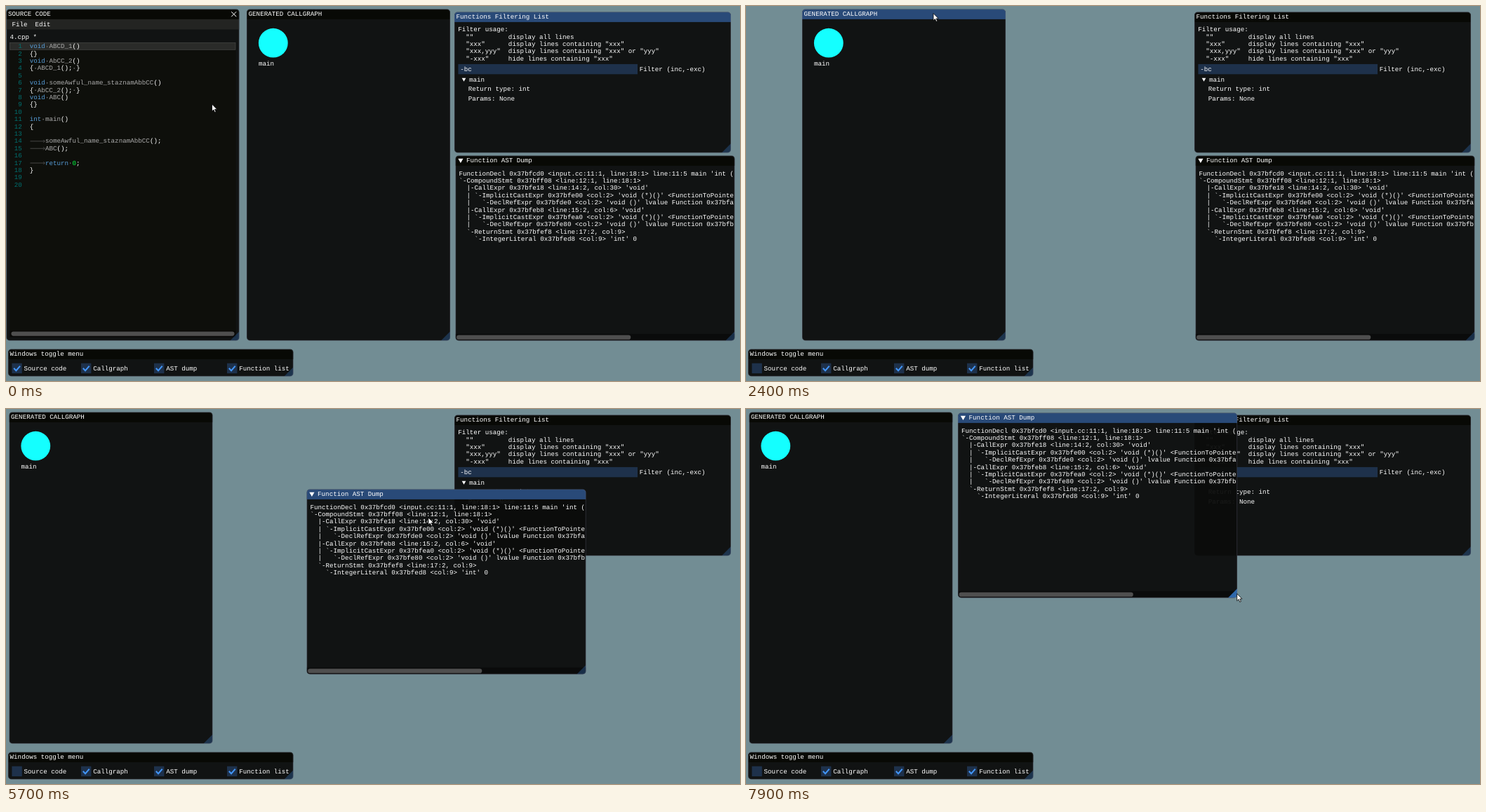
Animation of 1046 by 535 pixels, one loop 8 s. Source, as an HTML page:

```html
<!DOCTYPE html>
<html lang="en">
<head>
<meta charset="utf-8">
<title>Callgraph tool</title>
<style>
  html, body { margin: 0; width: 100%; height: 100%; overflow: hidden; background: #728d94; }
  svg { display: block; width: 100%; height: 100%; }
  text {
    font: 9.2px "Liberation Mono", monospace;
    fill: #fff;
    white-space: pre;
    text-rendering: geometricPrecision;
  }
  .body { fill: rgba(11, 12, 11, .94); }
  .title { fill: #080905; }
  .active .title { fill: #294a78; }
  .edge { fill: none; stroke: rgba(110, 110, 128, .42); stroke-width: .8; }
  .grip { fill: rgba(66, 150, 250, .25); }
  .grip.hover { fill: rgba(66, 150, 250, .67); }
  .frame { fill: rgba(41, 74, 122, .54); }
  .track { fill: rgba(5, 5, 5, .53); }
  .thumb { fill: #4f4f4f; }
  .tick { fill: none; stroke: #4296fa; stroke-width: 2; }
  .blank { fill: none; stroke: #555; stroke-width: .8; }
  .dot { fill: #656565; }
  .keyword { fill: #569cd6; }
  .number { fill: #00ff40; }
  .name { fill: #aaa; }
  .lineno { fill: #007070; }
</style>
</head>
<body>
<svg viewBox="0 0 1046 535"></svg>
<script>
const ADVANCE = 5.52, LINE = 10.39, LOOP = 8000, STEP = 100;
const svg = document.querySelector('svg');

function add(parent, tag, attrs, content) {
  const node = document.createElementNS('http://www.w3.org/2000/svg', tag);
  for (const key in attrs) node.setAttribute(key, attrs[key]);
  if (content !== undefined) node.textContent = content;
  parent.append(node);
  return node;
}
const label = (parent, x, y, content, cls = '') => add(parent, 'text', { x, y, class: cls }, content);
const box = (parent, x, y, width, height, cls, rx = 0) =>
  add(parent, 'rect', { x, y, width, height, rx, class: cls });
const rows = (parent, x, y, lines) => lines.forEach((line, i) => label(parent, x, y + i * LINE, line));

function makeWindow(id, x, y, w, h, title, titleX = 2.6) {
  const clip = add(svg, 'clipPath', { id: id + '-clip' });
  box(clip, 0, 0, w, h, '', 4.8);
  const root = add(svg, 'g', {});
  const inner = add(root, 'g', { 'clip-path': `url(#${id}-clip)` });
  box(inner, 0, 0, w, h, 'body');
  box(inner, 0, 0, w, 14.4, 'title');
  label(inner, titleX, 9.9, title);
  const content = add(inner, 'g', {});
  const grip = add(inner, 'path', { d: `M${w} ${h}v-13.2l-13.2 13.2z`, class: 'grip' });
  box(root, .3, .3, w - .6, h - .6, 'edge', 4.6);
  const win = {
    root, content, grip,
    move: (dx, dy) => root.setAttribute('transform', `translate(${x + dx} ${y + dy})`)
  };
  win.move(0, 0);
  return win;
}

function drawCode(parent, x, y, source) {
  const token = /(\t)|( )|(\b(?:void|int|return)\b)|([A-Za-z_]\w*)|(\d+)|([^\s\w]+)/g;
  const classes = ['', '', '', 'keyword', 'name', 'number', ''];
  source.forEach((line, i) => {
    const base = y + i * LINE;
    label(parent, x - 11 - ADVANCE * String(i + 1).length, base, i + 1, 'lineno');
    let col = 0;
    for (const match of line.matchAll(token)) {
      const left = x + col * ADVANCE, mid = base - 2.5;
      if (match[1]) {
        add(parent, 'path', { d: `M${left + .7} ${mid}h20.8m-2 -2l2 2l-2 2`, class: 'blank' });
        col += 4;
        continue;
      }
      if (match[2]) {
        add(parent, 'circle', { cx: left + ADVANCE / 2, cy: mid, r: .9, class: 'dot' });
      } else {
        label(parent, left, base, match[0], classes[match.findIndex((part, k) => k && part)]);
      }
      col += match[0].length;
    }
  });
}

// Source editor
const source = makeWindow('source', .5, 4.5, 332, 473, 'SOURCE CODE');
{
  const g = source.content;
  const hot = add(g, 'circle', { cx: 324, cy: 7.3, r: 5.9, fill: '#0f87fa' });
  source.showHot = on => hot.setAttribute('visibility', on ? 'inherit' : 'hidden');
  add(g, 'path', { d: 'M320.7 3.7l7 7m0 -7l-7 7', stroke: '#fff', 'stroke-width': 1 });
  add(g, 'rect', { y: 14.4, width: 332, height: 14.6, fill: '#232422' });
  label(g, 8, 24.6, 'File');
  label(g, 41, 24.6, 'Edit');
  label(g, 5, 42.8, '4.cpp *');
  add(g, 'rect', { x: 5, y: 47.6, width: 322, height: 420, fill: '#0e0f0b' });
  add(g, 'rect', { x: 5, y: 47.8, width: 321.5, height: 10, fill: '#2a2b29', stroke: '#484948', 'stroke-width': .7 });
  drawCode(g, 33.3, 55.8, [
    'void ABCD_1()', '{}', 'void AbCC_2()', '{ ABCD_1(); }', '',
    'void someAwful_name_staznamAbbCC()', '{ AbCC_2(); }', 'void ABC()', '{}', '',
    'int main()', '{', '', '\tsomeAwful_name_staznamAbbCC();', '\tABC();', '',
    '\treturn 0;', '}', '', ''
  ]);
  box(g, 5, 458.5, 322, 9.5, 'track');
  box(g, 7, 460, 318, 6.2, 'thumb', 3.1);
}

// Call graph
const graph = makeWindow('graph', 343, 4.5, 290, 473, 'GENERATED CALLGRAPH');
add(graph.content, 'circle', { cx: 37.8, cy: 48.2, r: 20.9, fill: '#14ffff' });
label(graph.content, 17, 80.8, 'main');

// Filter list
const filter = makeWindow('filter', 639, 8.5, 394, 201, 'Functions Filtering List');
{
  const g = filter.content;
  rows(g, 5.2, 27.8, [
    'Filter usage:',
    '  ""         display all lines',
    '  "xxx"      display lines containing "xxx"',
    '  "xxx,yyy"  display lines containing "xxx" or "yyy"',
    '  "-xxx"     hide lines containing "xxx"'
  ]);
  box(g, 5.4, 74.4, 255.6, 14.4, 'frame');
  label(g, 8.2, 84.4, '-bc');
  label(g, 263.8, 84.4, 'Filter (inc,-exc)');
  add(g, 'path', { d: 'M10.7 94.3h5.6l-2.8 5z', fill: '#fff' });
  label(g, 21, 99.7, 'main');
  label(g, 19.8, 112.8, 'Return type: int');
  label(g, 19.8, 126, 'Params: None');
}

// Toggle menu
const menu = makeWindow('menu', 3, 489.5, 406.5, 39, 'Windows toggle menu');
const ticks = [['Source code', 5.4], ['Callgraph', 104], ['AST dump', 208], ['Function list', 312]]
  .map(([name, x]) => {
    box(menu.content, x, 20.2, 14.4, 14.4, 'frame');
    label(menu.content, x + 17.2, 30.2, name);
    return add(menu.content, 'path', { d: `M${x + 2.8} 27.3l3.2 3.4l5.7 -6.6`, class: 'tick' });
  });

// AST dump
const ast = makeWindow('ast', 640.5, 213.5, 398, 264, 'Function AST Dump', 15.6);
{
  const g = ast.content;
  add(g, 'path', { d: 'M3.8 4.2h7.2l-3.6 6.3z', fill: '#fff' });
  const clip = add(svg, 'clipPath', { id: 'dump-clip' });
  box(clip, 0, 14, 396.6, 240);
  rows(add(g, 'g', { 'clip-path': 'url(#dump-clip)' }), 5, 28.1, [
    "FunctionDecl 0x37bfcd0 <input.cc:11:1, line:18:1> line:11:5 main 'int ()'",
    '`-CompoundStmt 0x37bff08 <line:12:1, line:18:1>',
    "  |-CallExpr 0x37bfe18 <line:14:2, col:30> 'void'",
    "  | `-ImplicitCastExpr 0x37bfe00 <col:2> 'void (*)()' <FunctionToPointe",
    "  |   `-DeclRefExpr 0x37bfde0 <col:2> 'void ()' lvalue Function 0x37bfa",
    "  |-CallExpr 0x37bfeb8 <line:15:2, col:6> 'void'",
    "  | `-ImplicitCastExpr 0x37bfea0 <col:2> 'void (*)()' <FunctionToPointe",
    "  |   `-DeclRefExpr 0x37bfe80 <col:2> 'void ()' lvalue Function 0x37bfb",
    '  `-ReturnStmt 0x37bfef8 <line:17:2, col:9>',
    "    `-IntegerLiteral 0x37bfed8 <col:9> 'int' 0"
  ]);
  box(g, 0, 254.3, 398, 9.7, 'track');
  box(g, 1.6, 256.1, 248.2, 6.2, 'thumb', 3.1);
}

const cursor = add(svg, 'path', {
  d: 'M0 0V10.2L2.4 8L4 11.8L5.7 11L4.1 7.4H7.3Z',
  fill: '#fff', stroke: '#000', 'stroke-width': .8
});

// Paths are [time, x, y]; a lone [time] holds the previous point.
const path = points => points.reduce((all, [t, x, y]) => {
  const last = all[all.length - 1];
  all.push(x === undefined ? [t, last[1], last[2]] : [t, x, y]);
  return all;
}, []);

const cursorPath = path([
  [200, 293.5, 140], [500, 318.3, 26.5], [600], [800, 329, 13], [900, 330.5, 9], [1100],
  [1200, 326, 11], [1700], [2000, 530, 10.5], [2100], [2200, 470, 10.5], [2400, 267, 10.5],
  [2600, 199, 15.5], [3000, 192.5, 11], [3100], [3300, 97, 10], [3400], [3500, 244.3, 14.5],
  [3600], [3900, 490, 6], [4200, 701.5, 14.5], [4300], [4400, 701, 14.5], [4500],
  [4800, 764.5, 235], [4900], [5100, 762, 209], [5200, 765, 222], [5300],
  [5700, 602, 155], [6200, 454, 19], [6300, 447.5, 17], [6700, 427, 15.5],
  [7100, 688, 228], [7400, 706, 266], [7700, 702.5, 264], [7800], [7900, 699.7, 263.5]
]);
const graphPath = path([
  [2100, 0, 0], [2200, -60, 0], [2400, -263, 0], [2600, -331, 5],
  [3000, -337.5, .5], [3100], [3200, -338.5, 0]
]);
const astPath = path([
  [5300, 0, 0], [5700, -212, -99], [6200, -311, -204.5],
  [6300, -318.5, -206.5], [6700, -338.5, -208]
]);

function at(points, t) {
  const i = points.findIndex(p => p[0] >= t);
  if (i === 0) return points[0].slice(1);
  if (i < 0) return points[points.length - 1].slice(1);
  const [t0, x0, y0] = points[i - 1], [t1, x1, y1] = points[i];
  const k = (t - t0) / (t1 - t0);
  return [x0 + (x1 - x0) * k, y0 + (y1 - y0) * k];
}

function focusAt(t) {
  if (t < 1200) return filter;
  if (t < 1300) return source;
  if (t < 1500) return null;
  if (t < 2100) return filter;
  return t < 5400 ? graph : ast;
}

function draw(now) {
  const t = Math.floor(now % LOOP / STEP) * STEP;
  const open = t < 1300, focus = focusAt(t);
  source.root.setAttribute('visibility', open ? 'visible' : 'hidden');
  ticks[0].setAttribute('visibility', open ? 'visible' : 'hidden');
  source.showHot(t === 1200);
  for (const win of [source, graph, filter, ast]) win.root.classList.toggle('active', win === focus);
  graph.move(...at(graphPath, t));
  ast.move(...at(astPath, t));
  ast.grip.classList.toggle('hover', t >= 7500);
  cursor.setAttribute('transform', `translate(${at(cursorPath, t)})`);
}

const start = performance.now();
function tick() {
  draw(performance.now() - start);
  requestAnimationFrame(tick);
}
tick();
</script>
</body>
</html>
```
